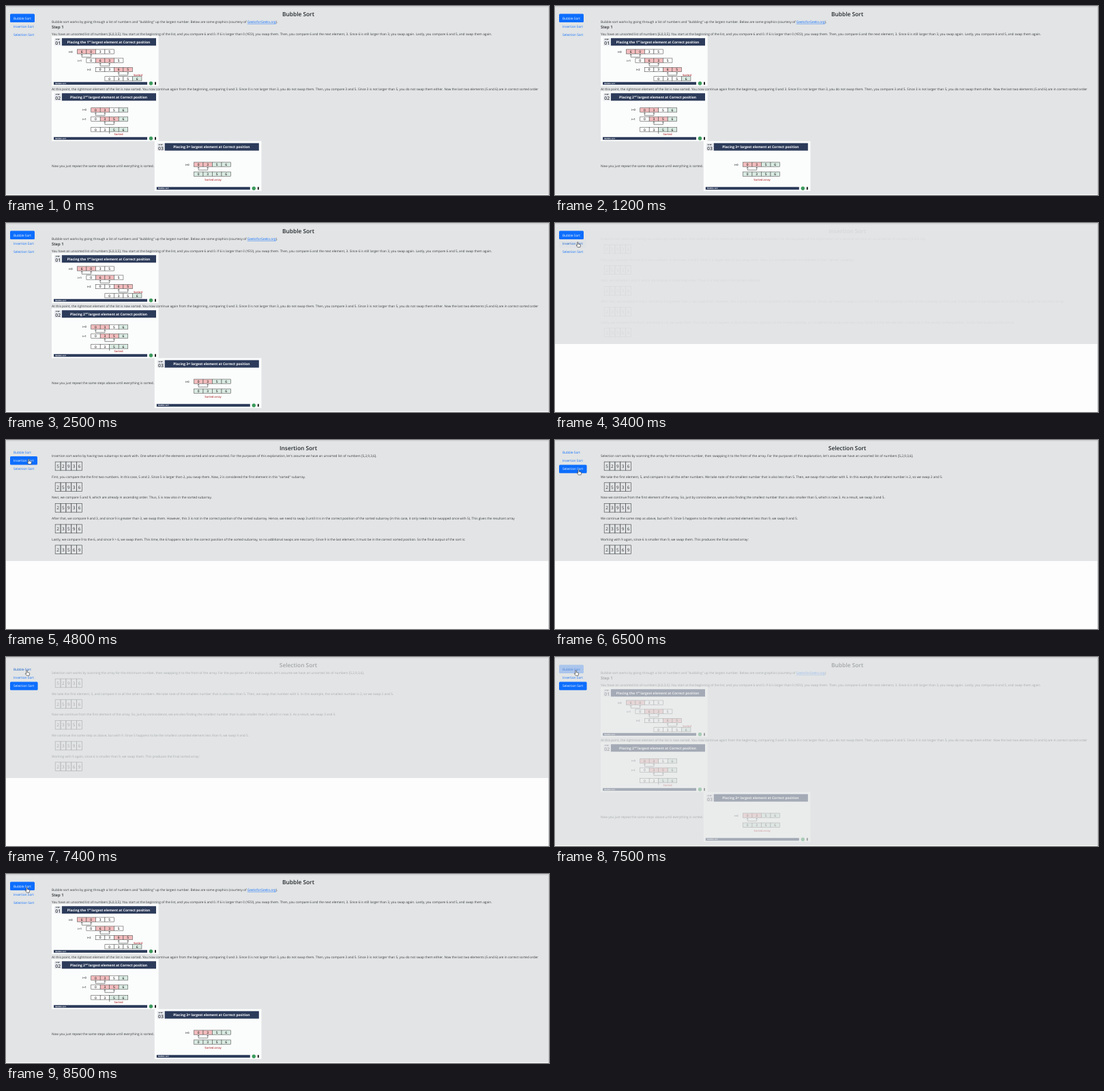
An HTML page that plays this animation: 796x278 px, repeating every 8600 ms.

```html
<!DOCTYPE html>
<html lang="en">
<head>
<meta charset="utf-8">
<title>Sorting tabs</title>
<style>
  html, body { margin: 0; width: 100%; height: 100%; overflow: hidden; background: #fdfdfd; }
  svg { display: block; width: 100vw; height: 100vh; }
  text { font-family: "Open Sans", "Noto Sans", sans-serif; font-size: 4.735px; fill: #36393c; text-rendering: geometricPrecision; }
  .h { font-size: 8.34px; font-weight: 600; fill: #25292d; text-anchor: middle; }
  .step { font-size: 5.9px; font-weight: 600; fill: #25292d; }
  .num { font-size: 6.4px; text-anchor: middle; }
  .cell { font-size: 4.9px; font-weight: 600; text-anchor: middle; fill: #333; }
  .cap { font-size: 4.95px; font-weight: 700; text-anchor: middle; fill: #fff; }
  .red { font-size: 4.1px; font-weight: 600; text-anchor: middle; fill: #b5393c; }
  .lab { font-size: 4.1px; font-weight: 600; }
  .tiny { font-size: 2.7px; font-weight: 700; }
  .link { fill: #0d6efd; text-decoration: underline; }
</style>
</head>
<body>
<svg id="stage" viewBox="0 0 796 278" preserveAspectRatio="none"></svg>
<script>
const LOOP = 8600, STEP = 100, FADE = 150;
const NAVY = '#2c3b5a', PINK = '#f3bcbd', MINT = '#d9ebe2';
const stage = document.getElementById('stage');

const rect = (x, y, w, h, fill, more = '') =>
  `<rect x="${x}" y="${y}" width="${w}" height="${h}" fill="${fill}" ${more}/>`;
const text = (x, y, s, cls = '') => `<text x="${x}" y="${y}" class="${cls}">${s}</text>`;
const line = d => `<path d="${d}" fill="none" stroke="#444" stroke-width=".6"/>`;

// ---- Bubble sort figures ----
// marks: p = pink, g = green, anything else = white
function row(x, y, digits, marks, label) {
  const w = 13.5;
  let out = label ? text(x - 12.6, y + 4.6, label, 'lab') : '';
  [...digits].forEach((d, i) => {
    const fill = { p: PINK, g: MINT }[marks[i]] || '#fff';
    out += rect(x + i * w, y, w, 6.3, fill, 'stroke="#555" stroke-width=".6"')
      + text(x + (i + .5) * w, y + 4.9, d, 'cell');
  });
  return out;
}

function swap(x, y) {
  const head = a => `M${a - 1.2} ${y + 1.5}L${a} ${y}L${a + 1.2} ${y + 1.5}`;
  return line(`M${x} ${y}V${y + 4.2}H${x + 13.5}V${y}` + head(x) + head(x + 13.5));
}

function card(x, y, no, title, body) {
  return rect(x, y, 156.7, 73.4, '#fbfcfc')
    + rect(x + 4, y + 3, 11, 11, '#e6e9ee')
    + text(x + 5.8, y + 5.9, 'STEP', 'tiny')
    + `<text x="${x + 5.3}" y="${y + 12.9}" style="font-size:6.8px;font-weight:600">${no}</text>`
    + rect(x + 15, y + 3, 138, 11, NAVY)
    + text(x + 83.6, y + 10.2, title, 'cap')
    + body
    + rect(x + 3, y + 67.5, 137, 4, NAVY)
    + `<text x="${x + 5.5}" y="${y + 70.6}" class="tiny" style="fill:#fff">Bubble sort</text>`
    + `<circle cx="${x + 145.5}" cy="${y + 69.5}" r="2.7" fill="#3c9a5c"/>`
    + rect(x + 151, y + 67.5, 2, 4, '#222');
}

const title = (lead, ord) =>
  `Placing ${lead}<tspan dy="-1.4" font-size="3" style="font-size:3px">${ord}</tspan>`
  + '<tspan dy="1.4"> largest element at Correct position</tspan>';

const bubble = text(428.5, 15.1, 'Bubble Sort', 'h')
  + text(67, 24.9, 'Bubble sort works by going through a list of numbers and "bubbling" up the largest number. '
    + 'Below are some graphics (courtesy of <tspan class="link">GeeksforGeeks.org</tspan>).')
  + text(67, 33.1, 'Step 1', 'step')
  + text(67, 42.6, 'You have an unsorted list of numbers [6,0,3,5]. You start at the beginning of the list, and you '
    + 'compare 6 and 0. If 6 is larger than 0 (YES!), you swap them. Then, you compare 6 and the next element, 3. '
    + 'Since 6 is still larger than 3, you swap again. Lastly, you compare 6 and 5, and swap them again.')
  + card(67, 44.3, '01', title('the 1', 'st'),
      row(104.4, 63.9, '6035', 'pp', 'i=0') + swap(111.2, 71)
      + row(117.9, 76.9, '0635', '-pp', 'i=1') + swap(138.2, 84)
      + row(131.4, 90.4, '0365', '--pp', 'i=2') + swap(165.2, 97.6)
      + row(144.9, 103.7, '0356', '---g') + text(193.5, 102.6, 'Sorted', 'red'))
  + text(67, 123.5, 'At this point, the rightmost element of the list is now sorted. You now continue again from the '
    + 'beginning, comparing 0 and 3. Since 0 is not larger than 3, you do not swap them. Then, you compare 3 and 5. '
    + 'Since 3 is not larger than 5, you do not swap them either. Now the last two elements (5 and 6) are in correct '
    + 'sorted order')
  + card(67, 125.3, '02', title('2', 'nd'),
      row(124.7, 149.8, '0356', 'pp-g', 'i=0') + swap(131.4, 156.9)
      + row(124.7, 163, '0356', '-ppg', 'i=1') + swap(144.9, 170.1)
      + row(124.7, 178.6, '0356', '--gg') + line('M151.7 185V188') + text(165, 190, 'Sorted', 'red'))
  + text(67, 237, 'Now you just repeat the same steps above until everything is sorted.')
  + card(217.8, 198.7, '03', title('3', 'rd'),
      row(275.5, 229.9, '0356', 'ppgg', 'i=0') + swap(282.2, 237)
      + row(275.5, 244, '0356', 'gggg') + text(303.5, 257.3, 'Sorted array', 'red'));

// ---- Insertion and selection panes ----
function article(name, parts) {
  return text(428.5, 14.9, name, 'h') + parts.map(([words, digits], i) => {
    const y = i * 30.68, top = 32.1 + y;
    return text(67, 24.9 + y, words) + [...digits].map((d, k) =>
      rect(72.2 + k * 7.85, top, 7.85, 12.7, 'none', 'stroke="#55585b" stroke-width=".7"')
      + text(76.1 + k * 7.85, top + 8.8, d, 'num')).join('');
  }).join('');
}

const insertion = article('Insertion Sort', [
  ['Insertion sort works by having two subarrays to work with. One where all of the elements are sorted and one '
    + 'unsorted. For the purposes of this explanation, let\'s assume we have an unsorted list of numbers [5,2,9,3,6].', '52936'],
  ['First, you compare the the first two numbers. In this case, 5 and 2. Since 5 is larger than 2, you swap them. '
    + 'Now, 2 is considered the first element in this "sorted" subarray.', '25936'],
  ['Next, we compare 5 and 9, which are already in ascending order. Thus, 5 is now also in the sorted subarray.', '25936'],
  ['After that, we compare 9 and 3, and since 9 is greater than 3, we swap them. However, this 3 is not in the correct '
    + 'position of the sorted subarray. Hence, we need to swap 3 until it is in the correct position of the sorted '
    + 'subarray (in this case, it only needs to be swapped once with 5). This gives the resultant array', '23596'],
  ['Lastly, we compare 9 to the 6, and since 9 &gt; 6, we swap them. This time, the 6 happens to be in the correct '
    + 'position of the sorted subarray, so no additional swaps are nesccarry. Since 9 is the last element, it must be '
    + 'in the correct sorted position. So the final output of the sort is:', '23569']
]);

const selection = article('Selection Sort', [
  ['Selection sort works by scanning the array for the minimum number, then swapping it to the front of the array. For '
    + 'the purposes of this explanation, let\'s assume we have an unsorted list of numbers [5,2,9,3,6].', '52936'],
  ['We take the first element, 5, and compare it to all the other numbers. We take note of the smallest number that is '
    + 'also less than 5. Then, we swap that number with 5. In this example, the smallest number is 2, so we swap 2 and 5.', '25936'],
  ['Now we continue from the first element of the array. So, just by conincidence, we are also finding the smallest '
    + 'number that is also smaller than 5, which is now 3. As a result, we swap 3 and 5.', '23956'],
  ['We continue the same step as above, but with 9. Since 5 happens to be the smallest unsorted element less than 9, we '
    + 'swap 9 and 5.', '23596'],
  ['Working with 9 again, since 6 is smaller than 9, we swap them. This produces the final sorted array:', '23569']
]);

// ---- Stage ----
const tabs = [
  { name: 'Bubble Sort', y: 11.6, w: 36, pane: bubble, height: 277 },
  { name: 'Insertion Sort', y: 24, w: 40, pane: insertion, height: 178 },
  { name: 'Selection Sort', y: 36.4, w: 40.6, pane: selection, height: 178 }
];
const PILL_H = 12.4;

stage.innerHTML = rect(0, 0, 796, 278, '#fdfdfd')
  + rect(0, 0, 796, 277, '#e2e4e5', 'id="page"')
  + rect(0, 0, 796, 1.6, '#cfd1d2')
  + rect(795, 0, 1, 278, '#c9cbcc')
  + tabs.map(t => `<g class="pane">${t.pane}</g>`).join('')
  + tabs.map(t => rect(6, t.y, t.w, PILL_H, '#0d6efd', 'rx="1.5" class="pill"')
    + text(11, t.y + 7.9, t.name, 'name')).join('')
  + `<g id="cursor" stroke="#222" stroke-width=".6" stroke-linejoin="round" fill="#fff">
      <path id="hand" d="M-.7 .5Q0 -.5 .7 .5V3L3.4 3.6Q4.2 3.9 4.1 4.8L3.5 7.6H-.3L-2.3 4.9Q-2.2 3.8 -.7 4.9Z"/>
      <path id="arrow" d="M0 0V6.4L1.5 5L2.6 7.4L3.6 6.9L2.6 4.6H4.6Z"/>
    </g>`;

const all = s => [...stage.querySelectorAll(s)];
const panes = all('.pane'), pills = all('.pill'), names = all('.name');
const [page, cursor, hand, arrow] = ['page', 'cursor', 'hand', 'arrow'].map(id => document.getElementById(id));

const clamp = v => Math.min(1, Math.max(0, v));
const ease = v => { v = clamp(v); return v * v * (3 - 2 * v); };
const mix = (a, b, k) => a + (b - a) * k;

// [time the new pane appears, tab]
const switches = [[-FADE * 2, 0], [3390, 1], [5890, 2], [7450, 0]];
// [time, x, y] of the pointer tip
const path = [[2800, 62, 74], [3200, 33.4, 28], [4800, 33.4, 28], [5500, 34.6, 43.6],
  [6700, 34.6, 43.6], [7200, 30.6, 19.6], [LOOP, 30.6, 19.6]];

function pointer(t) {
  const i = path.findIndex(p => p[0] > t);
  if (i < 1) return null;
  const [a, b] = [path[i - 1], path[i]];
  const k = ease((t - a[0]) / (b[0] - a[0]));
  return [mix(a[1], b[1], k), mix(a[2], b[2], k)];
}

function draw(t) {
  const n = switches.filter(s => s[0] <= t).length - 1;
  const [start, cur] = switches[n];
  const prev = n ? switches[n - 1][1] : -1;
  const next = switches[n + 1];
  const leave = next ? clamp((next[0] - t) / FADE) : 1;
  const shown = Math.min(clamp((t - start) / FADE), leave);
  const tip = pointer(t);
  let over = -1;
  if (tip) over = tabs.findIndex(b => tip[0] > 6 && tip[0] < 6 + b.w && tip[1] > b.y && tip[1] < b.y + PILL_H);

  page.setAttribute('height', tabs[cur].height);
  tabs.forEach((tab, i) => {
    panes[i].style.display = i === cur ? '' : 'none';
    panes[i].style.opacity = shown;
    let on = 0;
    if (i === cur) on = ease((t - start) / FADE);
    else if (i === prev) on = 1 - ease((t - start - 60) / FADE);
    pills[i].style.opacity = on;
    const rest = i === over ? [10, 88, 202] : [13, 110, 253];
    names[i].style.fill = `rgb(${rest.map(c => Math.round(mix(c, 255, on)))})`;
  });

  cursor.style.display = tip ? '' : 'none';
  if (tip) cursor.setAttribute('transform', `translate(${tip[0]} ${tip[1]})`);
  hand.style.display = over < 0 ? 'none' : '';
  arrow.style.display = over < 0 ? '' : 'none';
}

const begin = performance.now();
function tick() {
  const t = (performance.now() - begin) % LOOP;
  draw(Math.floor(t / STEP) * STEP);
  requestAnimationFrame(tick);
}
tick();
</script>
</body>
</html>
```
